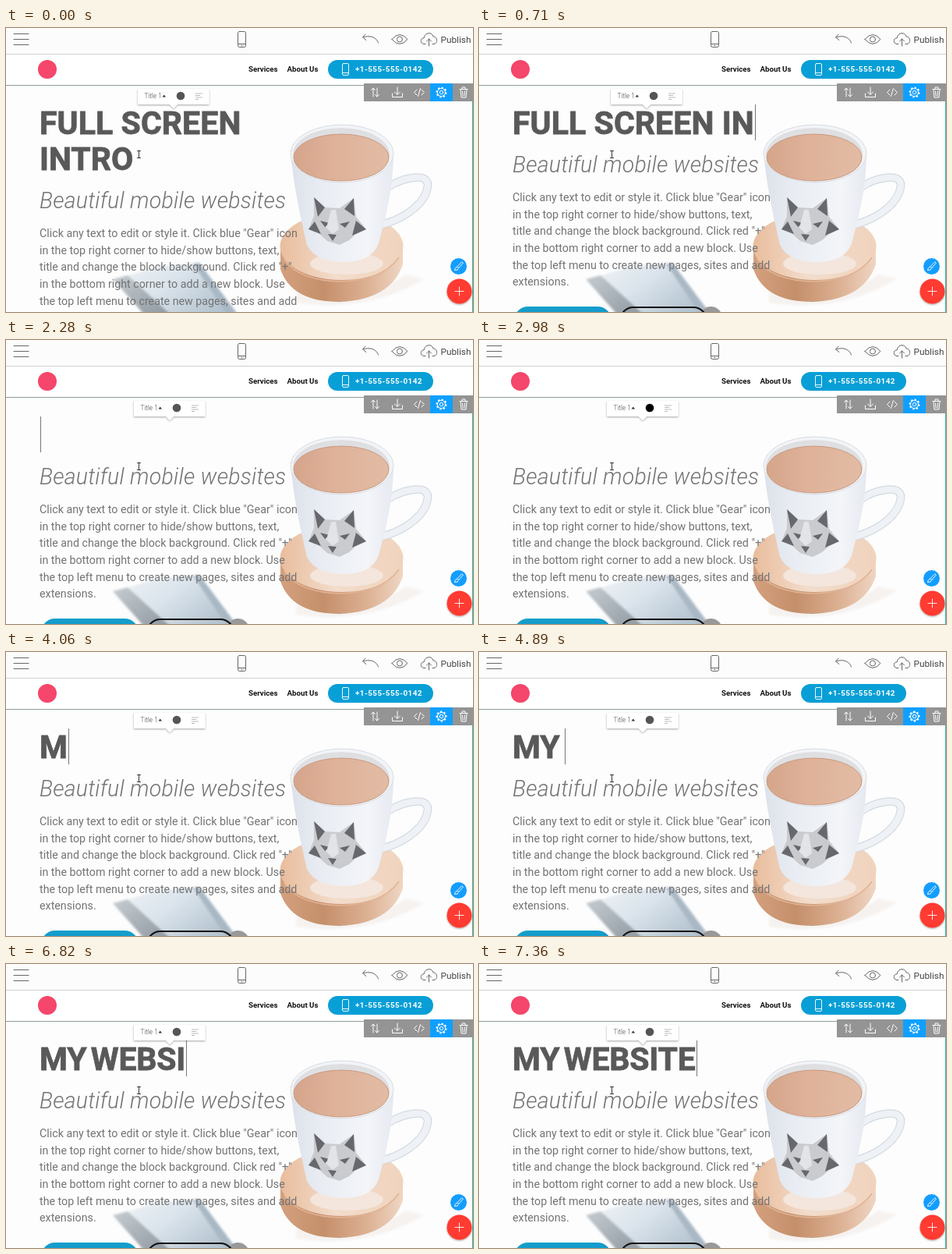
Write an HTML page that moves like this. It is 599 px wide and 364 px high and loops after 8000 ms.

```html
<!DOCTYPE html>
<html lang="en">
<head>
<meta charset="utf-8">
<title>Page editor</title>
<style>
html, body { margin: 0; width: 100%; height: 100%; overflow: hidden; background: #fff; }
#stage { position: relative; width: 599px; height: 364px; overflow: hidden; background: #fdfdfd; font-family: Roboto, sans-serif; }
svg { position: absolute; left: 0; top: 0; }
#content { position: absolute; left: 43px; top: 98px; white-space: pre; color: #737373; }
h1, h2, p { margin: 0; }
h1 { font: 700 41px/46px Roboto, sans-serif; color: #595959; -webkit-text-stroke: .8px #595959; }
h1 div { height: 46px; }
h1 .text { position: relative; top: 1px; }
#caret { display: inline-block; width: 1px; height: 46px; margin-left: 1px; background: #777; vertical-align: top; }
h2 { font: italic 300 28.5px/41px Roboto, sans-serif; letter-spacing: .23px; margin-top: 11px; }
p { font-size: 14.25px; line-height: 21.6px; margin-top: 11.3px; }
#buttons { position: relative; height: 40px; margin-top: 20px; }
#buttons i { position: absolute; box-sizing: border-box; top: 0; height: 36px; border-radius: 18px; }
#blue { left: 2px; width: 125px; background: #149dcc; }
#line { left: 137px; width: 113px; border: 2px solid #111; }
#add { left: 240px; width: 29px; background: #999; }
</style>
</head>
<body>
<div id="stage">
  <svg width="599" height="364">
    <defs>
      <linearGradient id="cup"><stop stop-color="#dde2ea"/><stop offset=".3" stop-color="#e9edf3"/><stop offset=".75" stop-color="#f3f5f9"/><stop offset="1" stop-color="#e6e9f0"/></linearGradient>
      <linearGradient id="phone" x2="1" y2=".6"><stop stop-color="#edf1f5"/><stop offset=".45" stop-color="#dbe4ec"/><stop offset="1" stop-color="#b3c3cf"/></linearGradient>
      <linearGradient id="edge" y2="1"><stop stop-color="#c6ccd1"/><stop offset="1" stop-color="#8d979f"/></linearGradient>
      <linearGradient id="wood"><stop stop-color="#e9bd9d"/><stop offset=".45" stop-color="#f2dccb"/><stop offset="1" stop-color="#f0d3bd"/></linearGradient>
      <linearGradient id="bark"><stop stop-color="#d3a07e"/><stop offset=".35" stop-color="#c58f6b"/><stop offset=".7" stop-color="#dcb092"/><stop offset="1" stop-color="#efd6c4"/></linearGradient>
      <linearGradient id="coffee"><stop stop-color="#d5a58b"/><stop offset=".4" stop-color="#deb198"/><stop offset="1" stop-color="#e3bca5"/></linearGradient>
      <filter id="soft"><feGaussianBlur stdDeviation="1.500"/></filter>
      <filter id="shade" x="-20%" y="-40%" width="140%" height="200%"><feDropShadow dx="0" dy="1" stdDeviation="1.2" flood-opacity=".35"/></filter>
    </defs>
    <g filter="url(#soft)">
      <path d="M155 318L192 306L247 301L298 368H206Z" fill="url(#phone)"/>
      <path d="M137 322L156 317L212 368H178Z" fill="url(#edge)"/>
      <path d="M240 302L248 301L298 368H284Z" fill="#a9b8c4"/>
      <path d="M372 336Q440 366 512 316L536 322Q460 366 372 352Z" fill="#f5f2f0"/>
    </g>
    <path d="M352 280V309Q366 351 428 351Q494 348 509 303V274Z" fill="url(#bark)"/>
    <ellipse cx="430.500" cy="280" rx="79" ry="43" fill="url(#wood)"/>
    <path d="M357 297Q376 324 430 325Q484 323 504 294" fill="none" stroke="#dfb394" stroke-width="1.500"/>
    <ellipse cx="437" cy="302" rx="47" ry="14" fill="#f4e6dc"/>
    <g fill="none" stroke-linejoin="round">
      <path id="handle" d="M490 204C508 192 542 184 541 202C539 223 515 243 482 252" stroke="#cfd5dd" stroke-width="10.500"/>
      <path d="M490 204C508 192 542 184 541 202C539 223 515 243 482 252" stroke="#eef1f5" stroke-width="8.500"/>
    </g>
    <path d="M365 160C368 196 377 240 386 278Q397 300 434 300Q470 299 478 276C487 242 497 205 497 160Z" fill="url(#cup)"/>
    <ellipse cx="431" cy="161" rx="66" ry="37" fill="#f2f4f7" stroke="#d8dce2"/>
    <ellipse cx="430" cy="162" rx="62" ry="34" fill="#dfdfe2"/>
    <ellipse cx="430" cy="166" rx="61" ry="30" fill="url(#coffee)" stroke="#c99a80"/>
    <path d="M395 217L409 230L428 231L446 218L449 242L462 258L449 264L440 272L428 278L412 273L402 264L388 258L395 241Z" fill="#c9cbcf"/>
    <path d="M395 217L409 230L400 242ZM446 218L447 241L434 232ZM403 247L415 250L409 255ZM428 251L441 248L435 256ZM413 264L424 265L419 273ZM388 258L396 248L404 264ZM462 258L449 247L444 266Z" fill="#66686d"/>
    <path d="M417 233L423 233L427 258L419 264L411 256Z" fill="#e2e4e8"/>
  </svg>

  <div id="content"><h1><div id="first"><span class="text" id="row1"></span></div><div id="second"><span class="text" id="row2"></span></div></h1><h2>Beautiful mobile websites</h2><p>Click any text to edit or style it. Click blue "Gear" icon
in the top right corner to hide/show buttons, text,
title and change the block background. Click red "+"
in the bottom right corner to add a new block. Use
the top left menu to create new pages, sites and add
extensions.</p><div id="buttons"><i id="add"></i><i id="blue"></i><i id="line"></i></div></div>

  <svg width="599" height="364" fill="none" stroke-linecap="round" stroke-linejoin="round">
    <path d="M598.500 94V364" stroke="#2fb0a8"/>
    <rect width="599" height="34" fill="#fcfcfc"/>
    <path d="M0 33.500H599" stroke="#cfcfcf"/>
    <rect y="34" width="599" height="39" fill="#fff"/>
    <path d="M0 73.500H599" stroke="#8d9b9b"/>
    <g stroke="#666">
      <path d="M10 7.500H29M10 14.500H29M10 21.500H29"/>
      <rect x="297.500" y="4.500" width="10" height="20" rx="2"/>
      <path d="M297.500 20.500H307.500M302 22.500H303"/>
      <path d="M461 8L457.500 12L462 15.500M458 12C466 9 475 11 477.500 19"/>
      <path d="M495 14.500Q505 2.500 515 14.500Q505 26.500 495 14.500Z"/>
      <circle cx="505" cy="14.500" r="3.500"/>
      <path d="M538 20.500H536C531 20 531 13 536 13C537 5 547 5 548 11C554 11 554 20 549 20.500H547M542.500 23V14M539.500 17L542.500 14L545.500 17"/>
    </g>
    <circle cx="53" cy="53" r="12" fill="#f5466b"/>
    <rect x="413" y="41" width="135" height="24" rx="12" fill="#089fd6"/>
    <g stroke="#fff" stroke-width=".9">
      <rect x="431.500" y="45.500" width="8" height="15" rx="1.500"/>
      <path d="M431.500 57.500H439.500"/>
    </g>
    <text x="557.500" y="18.500" font-size="11.800" fill="#444">Publish</text>
    <g font-size="9.700" font-weight="700" fill="#111">
      <text x="311" y="56">Services</text>
      <text x="360.500" y="56">About Us</text>
    </g>
    <text x="448" y="56" font-size="9.900" font-weight="700" letter-spacing=".45" fill="#fff">+1-555-555-0142</text>

    <rect x="459" y="71" width="140" height="23" fill="#949494"/>
    <rect x="544" y="71" width="29" height="23" fill="#0f9fff"/>
    <g stroke="#fff">
      <path d="M471 88V77M468.500 79.500L471 77L473.500 79.500M476 77V88M473.500 85.500L476 88L478.500 85.500"/>
      <path d="M502 76V85M498.500 82L502 85.500L505.500 82M495.500 84V88.500H508.500V84"/>
      <path d="M527 79L523.500 82.500L527 86M533 79L536.500 82.500L533 86M531.500 77.500L528.500 87.500"/>
      <path d="M582 78.500H592M585 78V76H589V78M583 79L584 89H590L591 79M585.500 81L586 87M588.500 81L588 87"/>
      <g id="gear">
        <circle r="5"/><circle r="2.200"/>
        <circle r="6" stroke-width="2" stroke-linecap="butt" pathLength="16" stroke-dasharray="1 1"/>
      </g>
    </g>

    <g id="tools">
      <path d="M169 78H260.500V98H220L215 103L210 98H169Z" fill="#fff" filter="url(#shade)"/>
      <text x="177.500" y="90" font-size="8.300" font-weight="300" fill="#444">Title 1</text>
      <path d="M200.500 88.500H205L202.750 85.500Z" fill="#333"/>
      <circle id="dot" cx="224" cy="87" r="5.300"/>
      <path d="M243 84H252M243 86.500H249M243 89H252M243 91.500H247" stroke="#aaa" stroke-width=".8" stroke-linecap="butt"/>
    </g>

    <path d="M168.500 157.500H172.500M168.500 166.500H172.500M170.500 157.500V166.500" stroke="#333"/>
    <circle cx="580.500" cy="305.500" r="10.500" fill="#149dff"/>
    <path d="M584.500 300L579 305.500L581 307.500L586 301.500ZM579 306.500Q576 306 575.500 310.500Q580 311 580.500 308" stroke="#fff" stroke-width=".9"/>
    <circle cx="581.500" cy="337.500" r="16" fill="#ff3b30" filter="url(#shade)"/>
    <path d="M576 337.500H587M581.500 332V343" stroke="#fff" stroke-width=".9"/>
  </svg>
</div>

<script>
const LOOP = 8000;
// [start ms, first row, second row, caret shown]
const typing = [
  [0, 'FULL SCREEN', 'INTRO', false],
  [250, 'FULL SCREEN', 'INTR', true],
  [710, 'FULL SCREEN IN', '', true],
  [835, 'FULL SCREE', '', true],
  [960, 'FULL SC', '', true],
  [1260, 'FULL S', '', true],
  [1380, 'FULL ', '', true],
  [1650, 'FULL', '', true],
  [1770, 'FUL', '', true],
  [1920, 'FU', '', true],
  [2040, 'F', '', true],
  [2280, '', '', true],
  [2980, '', '', false],
  [3410, 'M', '', true],
  [4190, 'MY', '', true],
  [4890, 'MY ', '', true],
  [5310, 'MY W', '', true],
  [5740, 'MY WE', '', true],
  [5860, 'MY WEB', '', true],
  [6260, 'MY WEBS', '', true],
  [6820, 'MY WEBSI', '', true],
  [7120, 'MY WEBSIT', '', true],
  [7360, 'MY WEBSITE', '', true]
];
const gearTurns = [3920, 4060, 4190, 4340, 4460, 4620, 4760, 4890, 5040, 5170, 5310, 5440];

const $ = id => document.getElementById(id);
const caret = document.createElement('span');
caret.id = 'caret';
let shown;

function showText(step) {
  if (step === shown) return;
  shown = step;
  const [, first, second, hasCaret] = step;
  const isNewTitle = first.startsWith('M');
  $('row1').textContent = first;
  $('row2').textContent = second;
  $('first').style.letterSpacing = isNewTitle ? '-.2px' : '.1px';
  $('first').style.wordSpacing = isNewTitle ? '-4.5px' : '0px';
  $('second').style.display = second ? '' : 'none';
  caret.style.visibility = hasCaret ? 'visible' : 'hidden';
  $(second ? 'row2' : 'row1').after(caret);
}

function draw(t) {
  showText(typing.findLast(step => step[0] <= t));
  const turns = gearTurns.filter(start => start <= t).length;
  $('gear').setAttribute('transform', `translate(558.5 82.5) rotate(${turns * 15})`);
  $('tools').setAttribute('transform', `translate(${t < 835 ? 0 : -5} 0)`);
  $('dot').setAttribute('fill', t >= 2400 && t < 3410 ? '#000' : '#555');
}

const begin = performance.now();
function tick() {
  draw((performance.now() - begin) % LOOP);
  requestAnimationFrame(tick);
}
tick();
</script>
</body>
</html>
```
